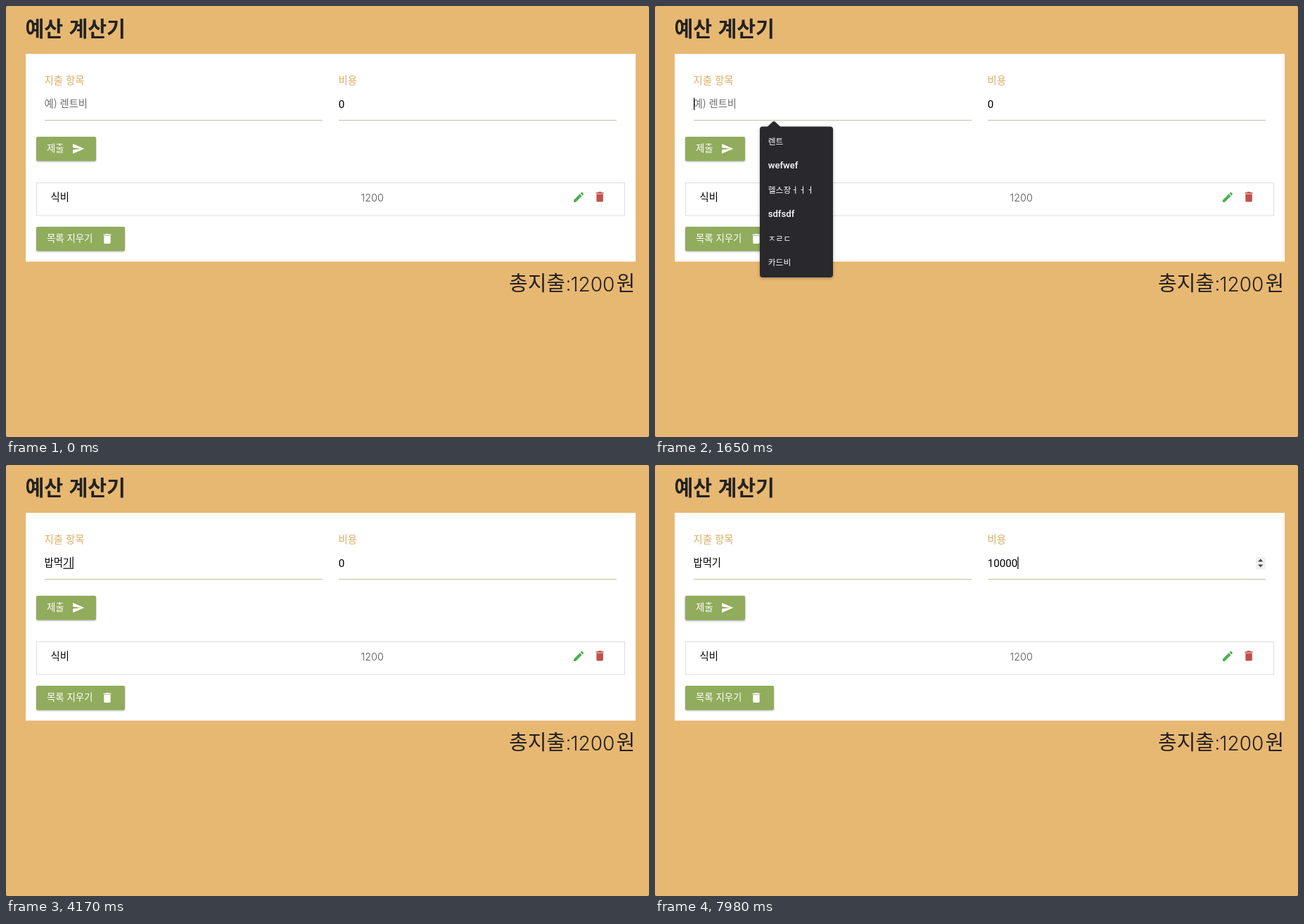
An HTML page that plays this animation: 914x613 px, repeating every 8 s.

```html
<!DOCTYPE html>
<html lang="ko">
<head>
<meta charset="utf-8">
<title>예산 계산기</title>
<style>
  html, body { margin: 0; width: 100%; height: 100%; overflow: hidden; background: #54493a; }
  svg { display: block; width: 914px; height: 613px; }
  text { font-family: "Noto Sans CJK KR", "Noto Sans CJK", "Noto Sans", sans-serif; font-size: 14.3px; white-space: pre; }
  .latin { font-family: Roboto, "Noto Sans CJK KR", sans-serif; font-size: 15.2px; }
  .round { font-family: Inter, sans-serif; font-weight: 300; }
  .title { font-size: 29.2px; font-weight: 700; fill: #222; }
  .label { font-size: 14.4px; fill: #daae65; }
  .button { fill: #90ac5c; }
  .caption { font-size: 13.4px; font-weight: 500; fill: #fff; }
  .item { font-size: 14.3px; font-weight: 500; }
  .total { font-size: 29px; fill: #231f20; }
  .menu text { font-family: Roboto, "Noto Sans CJK KR", sans-serif; font-size: 13.1px; font-weight: 500; fill: #fff; }
  .menu text.ko { font-size: 11.8px; font-weight: 400; }
</style>
</head>
<body>
<svg id="stage" viewBox="0 0 914 613">
  <defs>
    <path id="bin" d="M6 19c0 1.1.9 2 2 2h8c1.1 0 2-.9 2-2V7H6v12zM19 4h-3.5l-1-1h-5l-1 1H5v2h14V4z"/>
  </defs>
  <rect width="914" height="613" rx="2.5" fill="#e7b872"/>
  <text class="title" x="27.5" y="42.5">예산 계산기</text>
  <rect x="28" y="68" width="867" height="295.5" fill="#fff"/>

  <text class="label" x="54.5" y="111">지출 항목</text>
  <text class="label" x="472.5" y="111">비용</text>
  <path d="M55 162.5H450M473 162.5H868" stroke="#c2c0a6"/>

  <text id="hint" x="54.5" y="144" fill="#6f6f6f">예) 렌트비</text>
  <text id="name" x="54.5" y="144"></text>
  <rect id="composing" y="146.5" height="1.2" width="13"/>
  <text id="cost" class="latin" x="472.7" y="145"></text>
  <g id="spinner">
    <rect x="854" y="131" width="13.5" height="17.5" fill="#f0f0f0"/>
    <path d="M857 137.5l3.7-4 3.7 4zM857 141.5l3.7 4 3.7-4z" fill="#454545"/>
  </g>
  <rect id="caret" y="130.5" width="1.2" height="17.5"/>

  <rect id="submit" class="button" x="43" y="186" width="85" height="34.5" rx="2"/>
  <text class="caption" x="58" y="207">제출</text>
  <path transform="translate(93.6 193.8) scale(.77)" fill="#fff" d="M2.01 21L23 12 2.01 3 2 10l15 2-15 2z"/>

  <rect x="43.5" y="251.5" width="836" height="46.5" fill="#fff" stroke="#dcdcdc"/>
  <text class="item" x="63.5" y="276.5">식비</text>
  <text class="round" x="504.5" y="278" fill="#555" style="font-size:14.4px">1200</text>
  <path transform="translate(804.7 262.5) scale(.78)" fill="#4caf50" d="M3 17.25V21h3.75L17.81 9.94l-3.75-3.75L3 17.25zM20.71 7.04c.39-.39.39-1.02 0-1.41l-2.34-2.34c-.39-.39-1.02-.39-1.41 0l-1.83 1.83 3.75 3.75 1.83-1.83z"/>
  <use href="#bin" transform="translate(834.6 262) scale(.79)" fill="#c0504a"/>

  <rect id="clear" class="button" x="43" y="314" width="126" height="34.5" rx="2"/>
  <text class="caption" x="58" y="335">목록 지우기</text>
  <use href="#bin" transform="translate(134.6 321.6) scale(.78)" fill="#fff"/>

  <text class="total" x="715" y="405">총지출</text>
  <text class="total round" x="795.5" y="405" style="font-size:28px">:</text>
  <text class="total round" x="802.5" y="405.5" style="font-size:28px">1200</text>
  <text class="total" x="867.5" y="405">원</text>

  <g id="menu" class="menu">
    <path d="M153 171.5H160L167 165Q169 163 171 165L178 171.5H249Q253 171.5 253 175.5V382Q253 386 249 386H153Q149 386 149 382V175.5Q149 171.5 153 171.5Z"
      fill="#29282c" style="filter:drop-shadow(0 1px 2px rgba(0,0,0,.3))"/>
  </g>
</svg>
<script>
  const LOOP = 8000, BLINK = 450;
  const SYLLABLE = 13.16, DIGIT = 8.53;
  const OPEN_MENU = 780, FIRST_KEY = 2100, SWITCH_FIELD = 5280, HOVER = 7930;
  const $ = id => document.getElementById(id);

  const nameKeys = [
    [0, ''], [2100, 'ㅂ'], [2190, '바'], [2280, '밥'],
    [2700, '밥ㅁ'], [2790, '밥머'], [2880, '밥먹'],
    [4080, '밥먹ㄱ'], [4170, '밥먹기']
  ];
  const costKeys = [
    [0, '0'], [6420, ''], [6540, '1'], [6630, '10'],
    [6750, '100'], [6900, '1000'], [7020, '10000']
  ];
  // Each of these moments makes the caret solid again.
  const wakes = [OPEN_MENU, ...nameKeys.slice(1).map(k => k[0]), 5310, ...costKeys.slice(1).map(k => k[0])];

  ['렌트', 'wefwef', '헬스장ㅓㅓㅓ', 'sdfsdf', 'ㅈㄹㄷ', '카드비'].forEach((word, i) => {
    const row = document.createElementNS('http://www.w3.org/2000/svg', 'text');
    row.setAttribute('x', 160.7);
    row.setAttribute('y', 196.8 + i * 34.5);
    if (!/^[a-z]/.test(word)) row.setAttribute('class', 'ko');
    row.textContent = word;
    $('menu').append(row);
  });

  const valueAt = (keys, t) => keys.filter(k => k[0] <= t).pop()[1];
  const show = (id, on) => $(id).setAttribute('visibility', on ? 'visible' : 'hidden');
  const setText = (id, value) => { if ($(id).textContent !== value) $(id).textContent = value; };

  function shadow(id, lift) {
    $(id).style.filter = `drop-shadow(0 ${1 + lift * 0.8}px ${1 + lift * 0.6}px rgba(0,0,0,${0.28 + lift * 0.12}))`;
  }

  function draw(t) {
    const name = valueAt(nameKeys, t), cost = valueAt(costKeys, t);
    const inCost = t >= SWITCH_FIELD;
    setText('name', name);
    setText('cost', cost);
    show('hint', !name);
    show('menu', t >= OPEN_MENU && t < FIRST_KEY);
    show('spinner', inCost);

    show('composing', name && !inCost);
    $('composing').setAttribute('x', 55 + SYLLABLE * Math.max(0, name.length - 1));

    const wake = wakes.filter(w => w <= t).pop();
    // The first blink after opening the menu comes a little early.
    const since = t - (wake === OPEN_MENU ? 750 : wake);
    show('caret', t >= OPEN_MENU && Math.floor(since / BLINK) % 2 === 0);
    $('caret').setAttribute('x', inCost ? 472.7 + DIGIT * cost.length : 55 + SYLLABLE * name.length);

    shadow('submit', Math.min(1, Math.max(0, (t - HOVER) / 50)));
  }

  shadow('clear', 0);
  const start = performance.now();
  function tick() {
    draw((performance.now() - start) % LOOP);
    requestAnimationFrame(tick);
  }
  tick();
</script>
</body>
</html>
```
